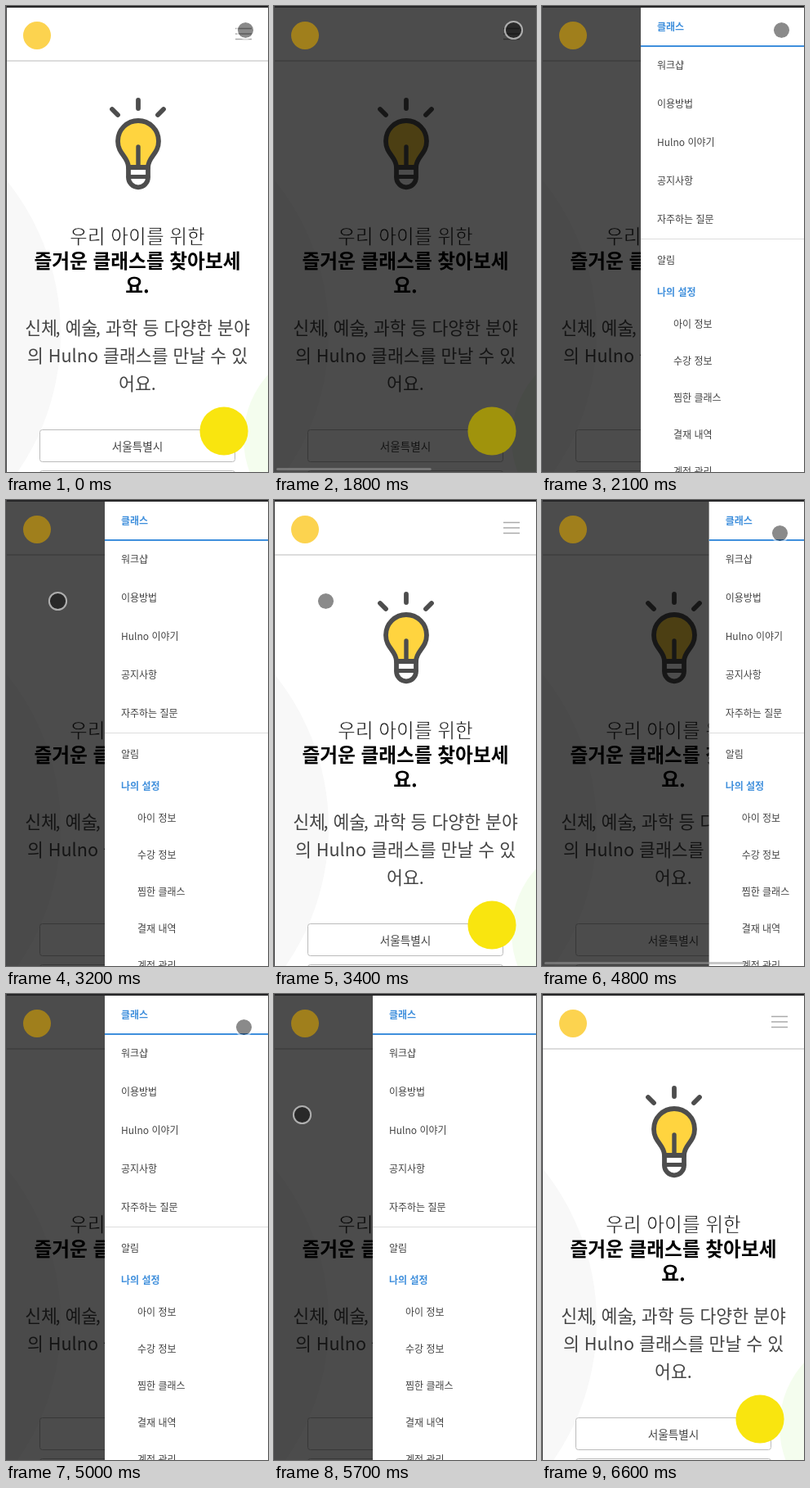
Animation of 321x569 px, one loop 6.9 s. Source, as an HTML page:

```html
<!DOCTYPE html>
<html lang="ko">
<head>
<meta charset="utf-8">
<style>
  html, body { margin: 0; width: 100%; height: 100%; overflow: hidden; background: #fff; }
  svg { display: block; width: 100%; height: 100%; }
  text { font-family: "Noto Sans CJK KR", "Noto Sans KR", "Noto Sans CJK", "Noto Sans CJK JP", sans-serif; fill: #444; }
  .mid { text-anchor: middle; }
  .title { font-size: 23.7px; font-weight: 700; fill: #000; }
  /* the white outline thins the strokes to a light weight */
  .thin { font-weight: 300; fill: #111; stroke: #fff; stroke-width: .6px; }
  .lead { font-size: 21.6px; }
  .menu text { font-size: 12px; }
  .menu .head { font-weight: 700; fill: #3f8fdc; }
  .box { fill: #fff; stroke: #bbb; }
</style>
</head>
<body>
<svg viewBox="0 0 321 569" preserveAspectRatio="none">
  <rect width="321" height="569" fill="#fff"/>
  <circle cx="-230" cy="400" r="297" fill="#f8f8f8"/>
  <circle cx="407" cy="528" r="116" fill="#f4fdee"/>

  <rect y="2" width="321" height="64" fill="#fff"/>
  <rect y="66" width="321" height="2" fill="#dcdcdc"/>
  <path d="M281 27.5h20M281 34h20M281 40.5h20" stroke="#aaa" stroke-width="1.6"/>

  <g fill="none" stroke="#4d4d4d" stroke-width="5.8" stroke-linecap="round" stroke-linejoin="round">
    <path d="M162 115v10M130 126l7 7M193 126l-7 7"/>
    <path d="M150 197C150 184 137 181 137 165A25 25 0 0 1 187 165C187 181 174 184 174 197Z" fill="#ffd43f"/>
    <path d="M150 197h24v12.3a12 12 0 0 1 -24 0Z" fill="#fff"/>
    <path d="M150 208.5h24" stroke-width="5"/>
    <path d="M162 172v24" stroke-width="5.4"/>
  </g>

  <g class="mid">
    <text class="title thin" x="161" y="290">우리 아이를 위한</text>
    <text class="title" x="161" y="319.7">즐거운 클래스를 찾아보세</text>
    <text class="title" x="161" y="349.7">요.</text>
    <text class="lead" x="161" y="401">신체<tspan dx="-2.5">,</tspan> 예술<tspan dx="-2.5">,</tspan> 과학 등 다양한 분야</text>
    <text class="lead" x="161" y="435">의 Hulno 클래스를 만날 수 있</text>
    <text class="lead" x="161" y="469">어요.</text>
  </g>
  <rect class="box" x="41.5" y="517.5" width="239" height="39" rx="3"/>
  <rect class="box" x="41.5" y="567.5" width="239" height="39" rx="3"/>
  <text class="mid" x="161" y="543" font-size="13.6">서울특별시</text>

  <rect id="shade" width="321" height="569" fill="#000" opacity=".7"/>
  <circle id="logo" cx="38" cy="36" r="17"/>
  <circle id="badge" cx="267" cy="519" r="29.6"/>

  <g id="drawer" class="menu">
    <rect width="200" height="569" fill="#fff"/>
    <rect y="48" width="200" height="2" fill="#3f8fdc"/>
    <rect y="284" width="200" height="1" fill="#ddd"/>
  </g>
  <rect id="bar" x="3" y="564" height="3" rx="1.5" fill="#999" opacity=".55"/>

  <path d="M0 1H321" stroke="#262628" stroke-width="2"/>
  <path d="M.5 0V569" stroke="#48484a"/>
  <g id="cursor">
    <circle r="9.6" fill="#000" opacity=".46"/>
    <circle r="10.6" fill="none" stroke="#fff" stroke-width="2" opacity=".55"/>
  </g>
</svg>
<script>
  const LOOP = 6900, STEP = 100;
  const $ = id => document.getElementById(id);
  const set = (id, name, value) => $(id).setAttribute(name, value);
  const clamp = p => Math.max(0, Math.min(1, p));
  const smooth = p => p * p * (3 - 2 * p);
  const easeOut = p => p * (2 - p);

  // label, left offset, vertical centre, heading?
  const items = [
    ['클래스', 20, 25.5, true], ['워크샵', 20, 72], ['이용방법', 20, 119],
    ['Hulno 이야기', 20, 166], ['공지사항', 20, 213], ['자주하는 질문', 20, 260],
    ['알림', 20, 310], ['나의 설정', 20, 349, true], ['아이 정보', 40, 388],
    ['수강 정보', 40, 433], ['찜한 클래스', 40, 478], ['결재 내역', 40, 523],
    ['계정 관리', 40, 568]
  ];
  for (const [label, x, y, head] of items) {
    const el = document.createElementNS('http://www.w3.org/2000/svg', 'text');
    el.textContent = label;
    el.setAttribute('x', x);
    el.setAttribute('y', y + 4.5);
    if (head) el.setAttribute('class', 'head');
    $('drawer').append(el);
  }

  // drawer: shown from, shown until, slide start
  const opens = [[1800, 3400, 1800], [4800, 6100, 4694]];
  const SLIDE = 300;

  // pointer: start, end, destination
  const moves = [
    [2600, 3000, 66, 118], [3100, 3200, 63.5, 123.5],
    [3600, 4000, 268, 49], [4100, 4300, 291.5, 40.5],
    [5000, 5300, 66, 127], [5400, 5700, 34.5, 147.5],
    [6300, 6600, 58, -38]
  ];

  function pointer(t) {
    let x = 293.5, y = 29.5;
    for (const [from, to, tx, ty] of moves) {
      const p = smooth(clamp((t - from) / (to - from)));
      x += (tx - x) * p;
      y += (ty - y) * p;
    }
    return [x, y];
  }

  function draw(t) {
    const open = opens.find(o => t >= o[0] && t < o[1]);
    const show = on => on ? 'visible' : 'hidden';
    const left = open ? 321 - 200 * easeOut(clamp((t - open[2]) / SLIDE)) : 321;
    set('shade', 'visibility', show(open));
    set('drawer', 'visibility', show(open));
    set('drawer', 'transform', `translate(${left})`);
    set('bar', 'visibility', show(open && left > 121));
    set('bar', 'width', 321 * 321 / (left + 200) - 8);
    set('logo', 'fill', open ? '#a07f1c' : '#fcd34f');
    set('badge', 'fill', open ? '#a0930c' : '#f9e50f');
    set('cursor', 'transform', `translate(${pointer(t)})`);
  }

  const start = performance.now();
  function tick() {
    const t = (performance.now() - start) % LOOP;
    draw(Math.floor(t / STEP) * STEP);
    requestAnimationFrame(tick);
  }
  draw(0);
  requestAnimationFrame(tick);
</script>
</body>
</html>
```
